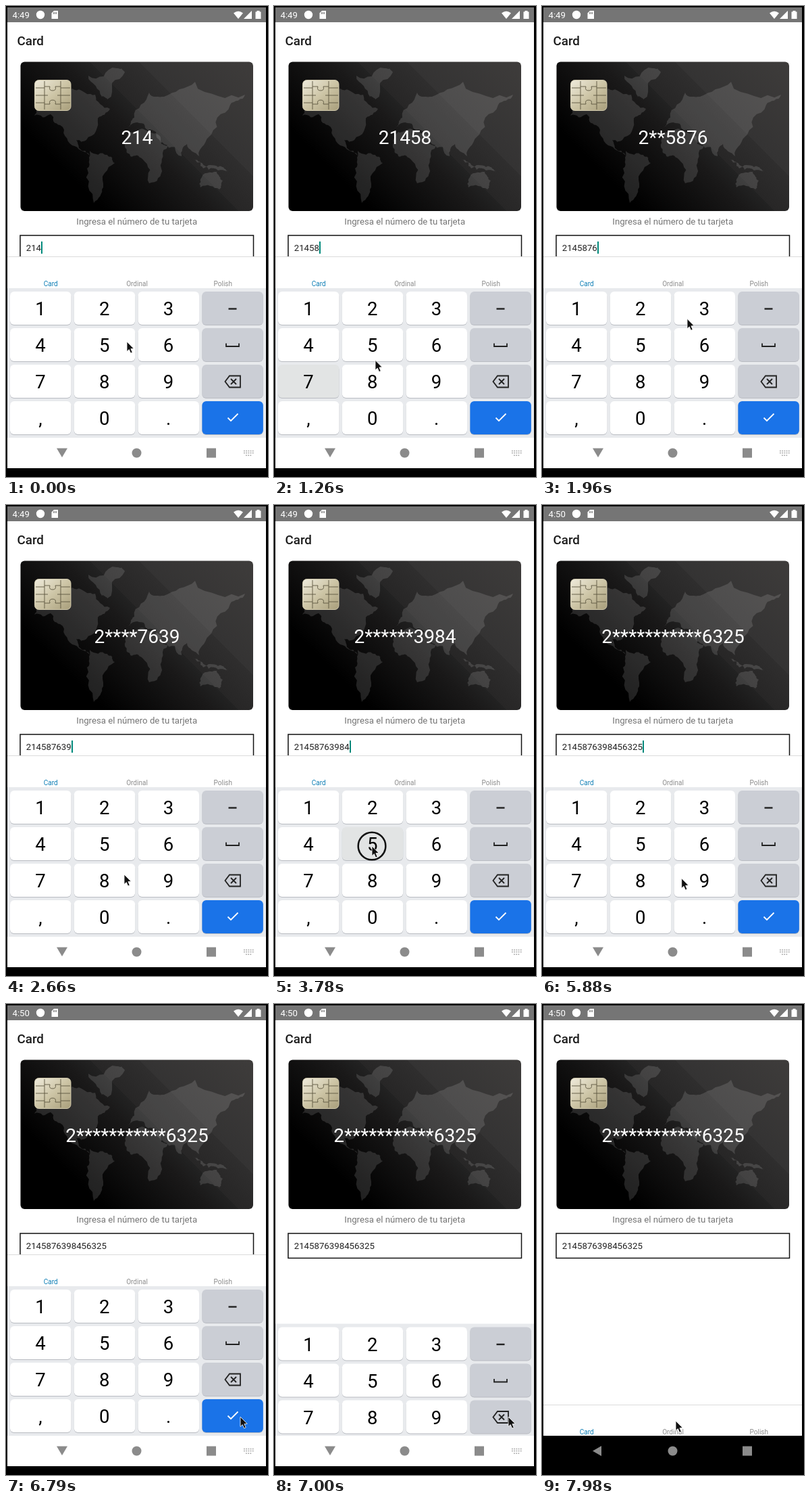
Write an HTML page that moves like this. It is 388 px wide and 696 px high and loops after 8000 ms.

```html
<!DOCTYPE html>
<html lang="es">
<head>
<meta charset="utf-8">
<title>Card</title>
<style>
  html, body { margin: 0; width: 100%; height: 100%; overflow: hidden; background: #000; }
  svg { display: block; width: 388px; height: 696px; font-family: Roboto, sans-serif; }
  .mid { text-anchor: middle; }
</style>
</head>
<body>
<svg viewBox="0 0 388 696">
  <defs>
    <linearGradient id="shade" gradientUnits="userSpaceOnUse" x1="53" y1="334" x2="335.5" y2="51.5">
      <stop offset=".22" stop-color="#000"/>
      <stop offset=".5" stop-color="#1a1919"/>
      <stop offset=".57" stop-color="#222"/>
      <stop offset=".57" stop-color="#272626"/>
      <stop offset=".7" stop-color="#2f2e2e"/>
      <stop offset=".7" stop-color="#343333"/>
      <stop offset="1" stop-color="#3e3c3b"/>
    </linearGradient>
    <linearGradient id="gold" x1="0" y1="0" x2="1" y2="1">
      <stop offset="0" stop-color="#efebdc"/>
      <stop offset=".5" stop-color="#cdc5a6"/>
      <stop offset="1" stop-color="#a89e7b"/>
    </linearGradient>
    <clipPath id="app"><rect x="2" y="2" width="383" height="636"/></clipPath>
  </defs>

  <rect width="388" height="696"/>
  <g clip-path="url(#app)">
    <rect x="2" y="24" width="384" height="614" fill="#fff"/>
    <rect x="2" y="2" width="384" height="22" fill="#757575"/>
    <g fill="#fff">
      <text id="clock" x="9.5" y="18" font-size="13.2"></text>
      <circle cx="51" cy="13" r="6.2"/>
      <path d="M71 7h6v12H67.5V10.5z"/>
      <path d="M337 10.5Q344 5 351 10.5L344 19z"/>
      <path d="M364 7v12h-12z"/>
      <path d="M369.5 8.5h2V7h4v1.5h2V19h-8z"/>
    </g>
    <path d="M70.5 9v3m2-3v3m2-3v3" stroke="#757575"/>
    <text x="16.5" y="58" font-size="18.8" font-weight="500" fill="#1c1c1c">Card</text>

    <rect x="21.5" y="82.5" width="344.5" height="220.5" rx="6" fill="url(#shade)"/>
    <g id="map" fill="#fff" fill-opacity=".13"></g>
    <g fill="none" stroke="#5c563f" stroke-width=".9">
      <rect x="42.5" y="109.5" width="53.5" height="45" rx="6" fill="url(#gold)" stroke="#d9d1b4"/>
      <path d="M44 121H57M44 132H62M44 143H57M95 121H81M95 132H76M95 143H81M57 111V153M81 111V153"/>
      <path d="M57 119H65Q63 125 69 125T73 119H81M57 145H65Q63 139 69 139T73 145H81"/>
    </g>
    <text id="masked" class="mid" x="194" y="204" font-size="28" fill="#fff"></text>
    <text class="mid" x="193.7" y="323" font-size="13.2" fill="#757575">Ingresa el número de tu tarjeta</text>
    <rect x="21" y="339" width="345.5" height="36.5" fill="#fff" stroke="#111" stroke-width="1.5"/>
    <text id="entry" x="29.7" y="362" font-size="13.25" fill="#222"></text>
    <rect id="caret" y="348" width="2" height="18" fill="#00897b"/>

    <g id="tabs" font-size="10" fill="#8c8c8c" class="mid">
      <rect x="2" y="370.5" width="384" height="47" fill="#fff"/>
      <path d="M2 370.5H386" stroke="#dcdcdc"/>
      <text x="66.3" y="414" fill="#0b7db5">Card</text>
      <text x="194" y="414">Ordinal</text>
      <text x="321.3" y="414">Polish</text>
    </g>

    <g id="keyboard">
      <rect x="2" y="417" width="384" height="222" fill="#e8eaed"/>
      <g id="keys" class="mid" font-size="27.5"></g>
      <g fill="none" stroke="#222" stroke-width="1.8">
        <path d="M329.5 447.5H341.5" stroke-width="2.4"/>
        <path d="M326 498.5V503H345V498.5"/>
        <path d="M331 546.5H347V563.5H331L324.5 555zM333 551L341 559M341 551L333 559"/>
        <path d="M328.5 608.5L333 613L343.5 602.5" stroke="#fff"/>
      </g>
    </g>
  </g>

  <rect id="navbar" x="2" y="638" width="383" height="45" fill="#fff"/>
  <g fill="#8b8b8b">
    <path id="back"/>
    <circle cx="193.5" cy="660.5" r="7"/>
    <rect x="297" y="653.5" width="14" height="14"/>
    <path id="switcher" d="M352 657.5H367M352 660.5H367M355 664H364" stroke="#a5a5a5" stroke-width="1.5" stroke-dasharray="1.8 1.4" fill="none"/>
  </g>

  <g id="pointer">
    <circle id="ring" r="20.3" fill="none" stroke="#111" stroke-width="2.5"/>
    <path d="M0 0V14.5L3.3 11.6L5.6 17L8.2 15.9L5.9 10.6L10.2 10.3Z" fill="#111" stroke="#fff" stroke-width=".8"/>
  </g>
</svg>
<script>
const $ = id => document.getElementById(id);
const LOOP = 8000, STEP = 70;
const MINUTE = 5250, SUBMIT = 6720, HIDE = 6860, HIDE_SPAN = 280;
const START = '214', TYPED = '5876398456325';
const ROWS = ['123-', '456_', '789<', ',0.>'];

// Rough coastlines: each edge is split at randomly displaced midpoints.
let seed = 7;
const random = () => (seed = seed * 16807 % 2147483647) / 2147483647;

function coast(a, b, depth) {
  if (!depth) return [a];
  const [dx, dy] = [b[0] - a[0], b[1] - a[1]], bend = (random() - .5) * .4;
  const m = [(a[0] + b[0]) / 2 - dy * bend, (a[1] + b[1]) / 2 + dx * bend];
  return [...coast(a, m, depth - 1), ...coast(m, b, depth - 1)];
}

const land = {
  northAmerica: '42,162 54,149 98,122 124,130 132,131 154,152 136,166 119,198 104,198 108,210 124,221 98,206 80,176 66,160',
  greenland: '122,103 164,92 176,98 150,138 142,134',
  southAmerica: '124,214 150,220 161,232 144,268 130,291 120,240',
  africa: '184,186 204,182 222,188 230,204 240,206 230,240 212,262 202,226 184,222 176,208',
  eurasia: '180,180 190,165 212,128 234,134 280,112 354,131 332,146 304,190 286,222 268,204 260,222 234,204 222,186 204,174',
  australia: '288,256 312,245 321,258 316,271 288,268',
  islands: '278,226 292,240 314,238 328,244 300,242'
};
$('map').innerHTML = Object.values(land).map(line => {
  const points = line.split(' ').map(p => p.split(',').map(Number));
  const edge = points.flatMap((p, i) => coast(p, points[(i + 1) % points.length], 3));
  return `<polygon points="${edge.map(p => p.map(v => v.toFixed(1))).join(' ')}"/>`;
}).join('');

$('keys').innerHTML = ROWS.map((line, r) => [...line].map((label, c) => {
  const x = 6 + 94.8 * c, y = 422 + 54 * r;
  const fill = label === '>' ? '#1a73e8' : c === 3 ? '#cbced5' : '#fff';
  const key = (dy, color, id = '') =>
    `<rect ${id} x="${x}" y="${y + dy}" width="90.4" height="49" rx="6" fill="${color}"/>`;
  return key(1, '#b9bcc2') + key(0, fill, `id="key${label}"`) +
    (c < 3 ? `<text x="${x + 45}" y="${y + 35}">${label}</text>` : '');
}).join('')).join('');

// A press shows the ring, lights the key, lets the pointer go and types on release.
const RING = 140, LIT = 60, LEAVE = 80, RELEASE = 195, TRAVEL = 210;
const times = [280, 700, 1070, 1680, 2080, 2465, 2990, 3290, 3710, 4200, 4480, 4835, 5250];
const presses = times.map((at, i) => {
  const digit = TYPED[i], r = ROWS.findIndex(line => line.includes(digit));
  const c = ROWS[r].indexOf(digit);
  return { at, digit, x: 145 + 70 * (c - 1), y: 504 + 42 * (r - 1) };
});
const trips = [
  { at: 0, span: 140 },
  ...presses.slice(0, -1).map(p => ({ at: p.at + LEAVE, span: TRAVEL }))
].map((trip, i) => ({ ...trip, x: presses[i].x, y: presses[i].y }));
trips.push(
  { at: 5670, span: 560, x: 340, y: 655 },
  { at: 6440, span: 140, x: 347, y: 610 },
  { at: 7350, span: 630, x: 198, y: 616 }
);

const within = (t, from, to) => t >= from && t < to;
const clamp = k => Math.min(1, Math.max(0, k));
const ease = k => k * k * (3 - 2 * k);
const show = (id, on) => $(id).setAttribute('visibility', on ? 'visible' : 'hidden');
const shift = (id, x, y) => $(id).setAttribute('transform', `translate(${x} ${y})`);
const mask = s => s.length <= 5 ? s : s[0] + '*'.repeat(s.length - 5) + s.slice(-4);

function pointerAt(t) {
  let x = 179, y = 496;
  for (const trip of trips) {
    const k = ease(clamp((t - trip.at) / trip.span));
    x += (trip.x - x) * k;
    y += (trip.y - y) * k;
  }
  return [x, y];
}

function render(t) {
  const done = presses.filter(p => t >= p.at + RELEASE);
  const number = START + TYPED.slice(0, done.length);
  const lastTyped = done.length ? done.at(-1).at + RELEASE : 0;
  $('masked').textContent = mask(number);
  $('entry').textContent = number;
  $('clock').textContent = t < MINUTE ? '4:49' : '4:50';
  $('caret').setAttribute('x', Math.round(30 + number.length * 7.44));
  show('caret', t < SUBMIT && (t - lastTyped) % 1000 < 500);

  for (const digit of new Set(TYPED)) {
    const lit = presses.some(p => p.digit === digit && within(t, p.at + LIT, p.at + RELEASE));
    $('key' + digit).setAttribute('fill', lit ? '#e2e4e4' : '#fff');
  }
  show('ring', presses.some(p => within(t, p.at, p.at + RING)) || within(t, SUBMIT, SUBMIT + STEP));
  shift('pointer', ...pointerAt(t));

  const k = clamp((t - HIDE) / HIDE_SPAN), closed = k === 1;
  shift('keyboard', 0, 222 * k * k);
  shift('tabs', 0, k > 0 ? 222 : 0);
  show('keyboard', !closed);
  show('switcher', !closed);
  $('navbar').setAttribute('fill', closed ? '#000' : '#fff');
  $('back').setAttribute('d', closed ? 'M88 653V668L75 660.5Z' : 'M75 653.5H91L83 667Z');
}

const begin = performance.now();
function tick() {
  const t = (performance.now() - begin) % LOOP;
  render(Math.floor(t / STEP) * STEP);
  requestAnimationFrame(tick);
}
tick();
</script>
</body>
</html>
```
